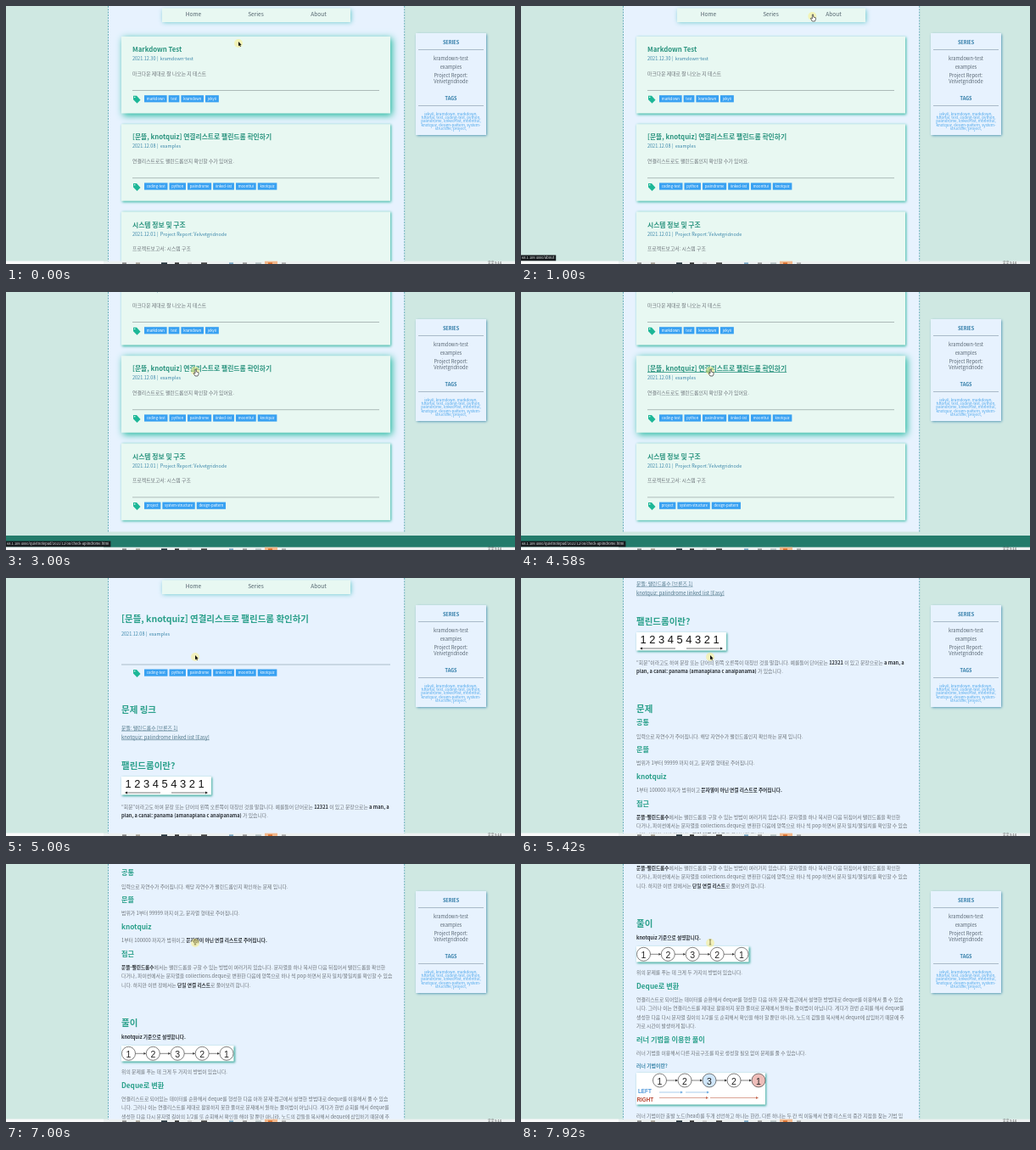
An HTML page with a canvas that plays this animation: 600x304 px, repeating every 8 s.

```html
<!DOCTYPE html>
<html lang="ko">
<head>
<meta charset="utf-8">
<style>
  html, body { margin: 0; width: 100%; height: 100%; overflow: hidden; background: #cfe8e2; }
  canvas { display: block; width: 600px; height: 304px; }
</style>
</head>
<body>
<canvas id="stage"></canvas>
<script>
const canvas = document.getElementById('stage');
const ctx = canvas.getContext('2d');
const ratio = window.devicePixelRatio || 1;
canvas.width = 600 * ratio;
canvas.height = 304 * ratio;

const FPS = 12, LOOP = 8000;
const SANS = "'Noto Sans CJK KR', 'Noto Sans CJK', 'Noto Sans', sans-serif";
const ARIAL = "'Liberation Sans', Arial, sans-serif";
const OUTER = '#cfe8e2', PAGE = '#e7f2fe', CARD = '#e8f8f2';
const TEAL = '#2b947f', HEAD = '#2ba08b', BLUE = '#3a86aa', GRAY = '#6c7379', PILL = '#38a1f2';
const RULE = '#9aacba';
const SITE = '68.1.109:4000/';
const BLOG = SITE + 'quietnotepad/2021/12/';

const POSTS = [
  { title: 'Markdown Test', date: '2021.12.30', series: 'kramdown-test',
    text: '마크다운 제대로 잘 나오는 지 테스트',
    tags: ['markdown', 'test', 'kramdown', 'jekyll'], url: BLOG + '30/markdown.html' },
  { title: '[문뜰, knotquiz] 연결리스트로 팰린드롬 확인하기', date: '2021.12.08', series: 'examples',
    text: '연결리스트로도 팰린드롬인지 확인할 수가 있어요.',
    tags: ['coding-test', 'python', 'palindrome', 'linked-list', 'moonttul', 'knotquiz'],
    url: BLOG + '08/check-aplindrome.html' },
  { title: '시스템 정보 및 구조', date: '2021.12.01', series: 'Project Report: Velvetgridnode',
    text: '프로젝트보고서: 시스템 구조',
    tags: ['project', 'system-structure', 'design-pattern'], url: BLOG + '01/system.html' }
];
const cardTop = i => 36 + i * 103.2;

// Article text: [style, centre y, line]
const ARTICLE = [
  ['h1', -15, '문제 링크'],
  ['link', 7, '문뜰: 팰린드롬수 [브론즈 1]'],
  ['link', 17.5, 'knotquiz: palindrome linked list [Easy]'],
  ['h1', 51, '팰린드롬이란?'],
  ['p', 100, '“회문”이라고도 하여 문장 또는 단어의 왼쪽 오른쪽이 대칭인 것을 말합니다. 예를들어 단어로는 **12321** 이 있고 문장으로는 **a man, a**'],
  ['p', 110, '**plan, a canal: panama (amanaplana c analpanama)** 가 있습니다.'],
  ['h1', 154, '문제'],
  ['h2', 170.5, '공통'],
  ['p', 186.7, '입력으로 자연수가 주어집니다. 해당 자연수가 팰린드롬인지 확인하는 문제 입니다.'],
  ['h2', 202.3, '문뜰'],
  ['p', 218, '범위가 1부터 99999 까지 이고, 문자열 형태로 주어집니다.'],
  ['h2', 234.5, 'knotquiz'],
  ['p', 250.3, '1부터 100000 까지가 범위이고 **문자열이 아닌 연결 리스트로 주어집니다.**'],
  ['h2', 266.5, '접근'],
  ['p', 282, '**문뜰-팰린드롬수**에서는 팰린드롬을 구할 수 있는 방법이 여러가지 있습니다. 문자열을 하나 복사한 다음 뒤집어서 팰린드롬을 확인한'],
  ['p', 292.2, '다거나, 파이썬에서는 문자열을 collections.deque로 변환한 다음에 양쪽으로 하나 씩 pop 하면서 문자 일치/불일치를 확인할 수 있습'],
  ['p', 302.5, '니다. 하지만 이번 장에서는 **단일 연결 리스트**로 풀어보려 합니다.'],
  ['h1', 347, '풀이'],
  ['p', 364, '**knotquiz 기준으로 설명합니다.**'],
  ['p', 405, '위의 문제를 푸는 데 크게 두 가지의 방법이 있습니다.'],
  ['h2', 421.5, 'Deque로 변환'],
  ['p', 437, '연결리스트로 되어있는 데이터를 순환해서 deque를 형성한 다음 아까 문제-접근에서 설명한 방법대로 deque를 이용해서 풀 수 있습'],
  ['p', 447.2, '니다. 그러나 이는 연결리스트를 제대로 활용하지 못한 풀이로 문제에서 원하는 풀이법이 아닙니다. 게다가 한번 순회를 해서 deque를'],
  ['p', 457.5, '생성한 다음 다시 문자열 길이의 1/2를 또 순회해서 확인을 해야 할 뿐만 아니라, 노드의 값들을 복사해서 deque에 삽입하기 때문에 추'],
  ['p', 467.7, '가로 시간이 발생하게 됩니다.'],
  ['h2', 484, '러너 기법을 이용한 풀이'],
  ['p', 500, '러너 기법을 이용해서 다른 자료구조를 따로 생성할 필요 없이 문제를 풀 수 있습니다.'],
  ['h3', 515, '러너 기법이란?'],
  ['p', 574, '러너 기법이란 출발 노드(head)를 두개 선언하고 하나는 한칸, 다른 하나는 두 칸 씩 이동해서 연결 리스트의 중간 지점을 찾는 기법 입'],
  ['p', 584, '니다.']
];
const STYLES = {
  h1: [10.5, HEAD, 'bold'], h2: [8.2, HEAD, 'bold'], h3: [5.9, BLUE, 'bold'],
  link: [5.85, '#4e7688', ''], p: [5.85, GRAY, '']
};

// Pointer path: [frame, x, y]
const POINTER = [[0, 274, 42], [1, 290, 40], [4, 521, 62], [8, 372, 10], [11, 368, 10],
  [14, 294, 10], [17, 221, 10], [20, 196, 60], [23, 187, 51], [28, 187, 51], [34, 223, 91]];

const clamp = v => Math.max(0, Math.min(1, v));
const smooth = (k, from, to) => { const p = clamp((k - from) / (to - from)); return p * p * (3 - 2 * p); };

function pointerAt(k) {
  const next = POINTER.findIndex(p => p[0] > k);
  if (next < 0) return POINTER[POINTER.length - 1].slice(1);
  const [a, x, y] = POINTER[next - 1], [b, u, v] = POINTER[next];
  const p = (k - a) / (b - a);
  return [x + (u - x) * p, y + (v - y) * p];
}

function rect(x, y, w, h, fill, shadow, blur = 3, offset = 1) {
  ctx.save();
  if (shadow) {
    ctx.shadowColor = shadow;
    ctx.shadowBlur = blur * ratio;
    ctx.shadowOffsetX = ctx.shadowOffsetY = offset * ratio;
  }
  ctx.fillStyle = fill;
  ctx.fillRect(x, y, w, h);
  ctx.restore();
}

function text(str, x, y, size, color, weight = '', align = 'left', family = SANS) {
  ctx.font = `${weight} ${size}px ${family}`;
  ctx.fillStyle = color;
  ctx.textAlign = align;
  ctx.fillText(str, x, y + size * 0.36);
  return ctx.measureText(str).width;
}

// Pairs of ** switch to bold, set slightly smaller to keep the same rhythm
function richText(str, x, y, size, color, weight) {
  str.split('**').forEach((part, i) => {
    x += i % 2 ? text(part, x, y, size * 0.97, '#2b3035', 'bold') : text(part, x, y, size, color, weight);
  });
  return x;
}

function line(x1, y1, x2, y2, color, width = 0.6, dash = []) {
  ctx.strokeStyle = color;
  ctx.lineWidth = width;
  ctx.setLineDash(dash);
  ctx.beginPath();
  ctx.moveTo(x1, y1);
  ctx.lineTo(x2, y2);
  ctx.stroke();
  ctx.setLineDash([]);
}

function polygon(points, fill, stroke) {
  ctx.beginPath();
  points.forEach(([x, y]) => ctx.lineTo(x, y));
  ctx.closePath();
  ctx.fillStyle = fill;
  ctx.fill();
  if (stroke) { ctx.strokeStyle = stroke; ctx.lineWidth = 0.7; ctx.stroke(); }
}

function disc(x, y, r, fill, stroke) {
  ctx.beginPath();
  ctx.arc(x, y, r, 0, 7);
  ctx.fillStyle = fill;
  ctx.fill();
  if (stroke) { ctx.strokeStyle = stroke; ctx.lineWidth = 0.7; ctx.stroke(); }
}

function arrow(x1, x2, y, color) {
  const d = Math.sign(x2 - x1) * 3;
  line(x1, y, x2 - d, y, color, 0.6);
  polygon([[x2, y], [x2 - d, y - 1.4], [x2 - d, y + 1.4]], color);
}

function column(bottom) {
  rect(120, 0, 350, bottom, PAGE);
  for (const x of [120.5, 469.7]) line(x, 0, x, bottom, '#5aa6b0', 0.9, [2, 1.3]);
}

function nav(y) {
  rect(184, y, 222, 16.5, CARD, 'rgba(70,190,190,.75)', 5, 1);
  [['Home', 221], ['Series', 294.5], ['About', 368.5]].forEach(([label, x]) =>
    text(label, x, y + 7.5, 6.6, '#52636d', '', 'center'));
}

function tagRow(tags, y) {
  polygon([[150, y], [154, y], [158.5, y + 5], [154.5, y + 9], [150, y + 4.5]], '#1cb797');
  disc(151.7, y + 1.8, 0.8, CARD);
  let x = 163;
  for (const tag of tags) {
    ctx.font = `4.2px ${SANS}`;
    const w = ctx.measureText(tag).width + 5.5;
    rect(x, y - 0.5, w, 8.2, PILL);
    text(tag, x + 2.75, y + 3.4, 4.2, '#fff');
    x += w + 2;
  }
}

function card(post, y, hovered, underlined) {
  rect(136, y, 317, 90.5, CARD, hovered ? '#20b89d' : '#38b9a4', hovered ? 8 : 3, hovered ? 2 : 1);
  const w = text(post.title, 149, y + 15.3, 7.8, TEAL, 'bold');
  if (underlined) line(149, y + 19.3, 149 + w, y + 19.3, TEAL, 0.8);
  text(`${post.date} |  ${post.series}`, 149, y + 26.3, 5.5, BLUE);
  text(post.text, 149, y + 43.5, 5.85, GRAY);
  line(149, y + 63.5, 440, y + 63.5, '#9dabaa', 0.8);
  tagRow(post.tags, y + 69.7);
}

function home(k, x, y) {
  const scroll = 64 * smooth(k, 28, 35);
  column(346.5 - scroll);
  nav(2.5 - scroll);
  POSTS.forEach((post, i) => {
    const top = cardTop(i) - scroll;
    const hovered = x > 136 && x < 453 && y > top && y < top + 90;
    const underlined = i === 0 ? k >= 21 && k < 30 : i === 1 && k >= 38;
    card(post, top, hovered, underlined);
  });
  rect(0, 351 - scroll, 600, 40, '#237b6b');
}

function nodes(xs, y, fills = {}) {
  xs.forEach((x, i) => {
    if (i) arrow(xs[i - 1] + 8, x - 8, y, '#333');
    disc(x, y, 8, fills[i] || '#fff', '#4a4a4a');
    text('12321'[i], x, y + 1, 10.5, '#222', '', 'center', ARIAL);
  });
}

function figure(y, w, h) {
  rect(136, y, w, h, '#fff', '#3aa99b', 2.5, 1);
}

function article(k) {
  const lead = 170;
  const scroll = -lead * (1 - smooth(k, 60, 65)) + 160 * smooth(k, 72, 81) + 117 * smooth(k, 90, 95);
  column(304);
  ctx.save();
  ctx.translate(0, -scroll);
  nav(2.5 - lead);
  text(POSTS[1].title, 136, -122, 10.5, HEAD, 'bold');
  text(`${POSTS[1].date} |  ${POSTS[1].series}`, 136, -104, 5.5, BLUE);
  line(136, -68, 453, -68, RULE, 0.8);
  tagRow(POSTS[1].tags, -62);
  for (const [style, y, str] of ARTICLE) {
    if (y < scroll - 15 || y > scroll + 315) continue;
    const [size, color, weight] = STYLES[style];
    const end = richText(str, 136, y, size, color, weight);
    if (style === 'link') line(136, y + 3.2, end, y + 3.2, color, 0.6);
  }

  figure(64, 106, 21.5);
  text('1 2 3 4 5 4 3 2 1', 140.5, 72, 12.9, '#111', '', 'left', ARIAL);
  arrow(182, 140, 83, '#222');
  arrow(195, 238, 83, '#222');

  figure(374, 132.5, 18.5);
  nodes([144.5, 173.3, 202.2, 231.2, 260], 383.3);

  figure(523, 152, 37.5);
  nodes([163.5, 193, 222, 251, 280], 532, { 2: '#cfe6fa', 4: '#eebdb9' });
  text('LEFT', 138, 545, 6.3, '#4a94d8', 'bold', 'left', ARIAL);
  text('RIGHT', 136.5, 555, 6.3, '#b7442f', 'bold', 'left', ARIAL);
  arrow(163, 191, 546, '#6fabe0');
  arrow(194, 222, 546, '#6fabe0');
  arrow(163, 221, 552.5, '#c4674f');
  arrow(223, 280, 552.5, '#c4674f');
  ctx.restore();
}

function sidebar() {
  rect(483, 32, 83, 120, PAGE, '#337fac', 3, 0.7);
  const centered = (str, y, size, color, weight) => text(str, 524.5, y, size, color, weight, 'center');
  centered('SERIES', 42.7, 5.5, '#2a78a5', 'bold');
  line(486, 51.5, 563, 51.5, RULE, 0.8);
  [['kramdown-test', 62], ['examples', 71.7], ['Project Report:', 81.5], ['Velvetgridnode', 89]]
    .forEach(([label, y]) => centered(label, y, 5.75, '#5a6874'));
  centered('TAGS', 109, 5.5, '#2a78a5', 'bold');
  line(486, 117.5, 563, 117.5, RULE, 0.8);
  ['jekyll, kramdown, markdown,', 'tutorial, test, coding-test, python,', 'palindrome, linked-list, moonttul,',
    'knotquiz, design-pattern, system-', 'structure, project,']
    .forEach((row, i) => centered(row, 127 + i * 4.35, 4.5, '#4ba6ec'));
}

function status(k, x, y) {
  let url = '';
  if (k < 30 && y < 20 && x > 195 && x < 395) url = SITE + (x < 245 ? '' : x < 330 ? 'series' : 'about');
  else if (k < 30 && x > 500) url = SITE + 'series/kramdown-test';
  else if (k >= 21 && k < 30) url = POSTS[0].url;
  else if (k >= 34 && k < 56) url = POSTS[1].url;
  if (!url) return;
  ctx.font = `4px ${SANS}`;
  rect(0, 293.5, ctx.measureText(url).width + 3, 7, '#171b1e');
  text(url, 1, 297, 4, '#e4e7e8');
}

function taskbar() {
  rect(0, 300.7, 600, 3.3, '#edf1f1');
  rect(0, 300.7, 115, 3.3, '#fafafa');
  rect(305, 300.7, 15, 3.3, '#f3b98c');
  const colors = ['#888', '#a9a398', '#26343c', '#333', '#c8c8c8', '#444', '#7aa7c4', '#999', '#b7c2c4', '#d9702e', '#aaa'];
  [140, 156, 186, 202, 217, 233, 266, 282, 297, 312, 328].forEach((x, i) =>
    rect(x - 3, 302.3, i % 3 === 2 ? 7 : 5, 1.7, colors[i]));
  text('오후 5:14', 584, 303, 4, '#444', '', 'right');
}

function pointer(k, x, y) {
  disc(x, y + 2, 5, 'rgba(255,240,110,.45)');
  const onLink = (k >= 10 && k < 18) || (k >= 21 && k < 30) || (k >= 34 && k < 56);
  if (k >= 80) {
    line(x, y - 2, x, y + 4, '#6b632c', 0.8);
    line(x - 1.3, y - 2, x + 1.3, y - 2, '#6b632c', 0.6);
    line(x - 1.3, y + 4, x + 1.3, y + 4, '#6b632c', 0.6);
  } else if (onLink) {
    polygon([[0, 0], [1.2, 0], [1.4, 3], [4, 3.8], [4, 6], [3, 8], [0, 8], [-2, 4.5], [-1, 4], [0, 5]]
      .map(([u, v]) => [x + u, y + v]), '#fff', '#333');
  } else {
    polygon([[0, 0], [0, 5.3], [1.2, 4.2], [2.1, 6], [2.9, 5.6], [2.1, 3.9], [3.6, 3.7]]
      .map(([u, v]) => [x + u, y + v]), '#111');
  }
}

function draw(ms) {
  const k = Math.floor((ms + 5) * FPS / 1000);
  const [x, y] = pointerAt(k);
  ctx.setTransform(ratio, 0, 0, ratio, 0, 0);
  rect(0, 0, 600, 304, OUTER);
  if (k < 56) home(k, x, y);
  else article(k);
  sidebar();
  status(k, x, y);
  taskbar();
  pointer(k, x, y);
}

const start = performance.now();
function tick() {
  draw((performance.now() - start) % LOOP);
  requestAnimationFrame(tick);
}
tick();
</script>
</body>
</html>
```
